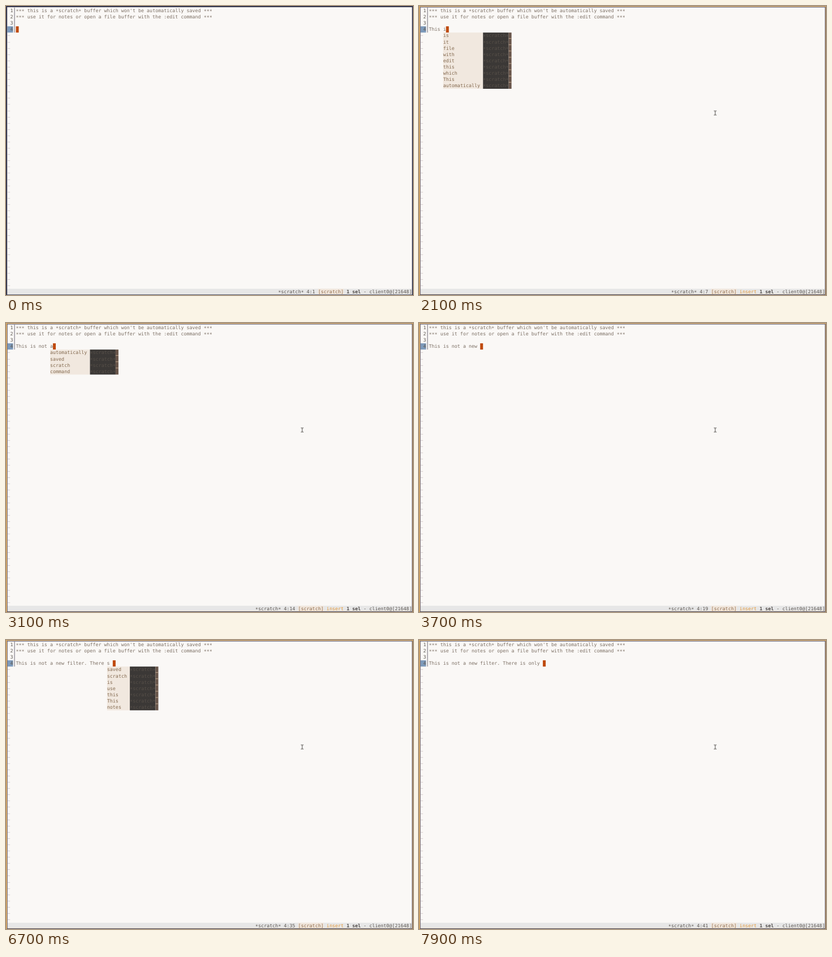
An HTML page that plays this animation: 720 px wide and 513 px high, repeating every 8 s.

```html
<!DOCTYPE html>
<html lang="en">
<head>
<meta charset="utf-8">
<title>Scratch buffer</title>
<style>
html, body { margin: 0; width: 100%; height: 100%; overflow: hidden; background: #faf8f6; }
svg { display: block; width: 720px; height: 513px; }
text { font: 8.37px "DejaVu Sans Mono", monospace; white-space: pre; text-rendering: geometricPrecision; }
.bold { font-weight: bold; }
</style>
</head>
<body>
<svg id="stage" viewBox="0 0 720 513"></svg>
<script>
const LOOP = 8000, KEY = 100, FOCUS = 500, INSERT = 1300;
const CW = 5.04, RH = 11.09, TOP = 2.8, LEFT = 17.5, RIGHT = 718.3;
const INK = '#7c6f64', STATUS_ROW = 45;
const stage = document.getElementById('stage');

// Bursts of typing, one key per 100 ms: "." only in text, "|" waits,
// "<" deletes, "~" is a space that leaves the menu open.
const BURSTS = [
  [1600, 'Th'], [1900, ['is', ' ', 'i', 's', ' ', 'n', 'o', 't', ' ']],
  [3000, 'a| n|ew '], [3900, 'f|ilter. '], [5600, 'Ther'],
  [6200, 'e s||~|<<'], [7100, 'i|s only ']
];
const keys = BURSTS.flatMap(([start, list]) =>
  [...list].map((key, i) => ({ at: start + i * KEY, key })));

const WORDS = ('saved scratch is it use file with edit this which This notes ' +
  'automatically command buffer open or for be the won').split(' ');

const col = i => LEFT + i * CW;
const row = i => TOP + i * RH;

const rect = (x, y, w, h, fill) =>
  `<rect x="${x}" y="${y}" width="${w}" height="${h}" fill="${fill}"/>`;

// Asterisks sit lower than the font draws them.
function text(str, x, r, fill = INK, cls = '') {
  let dy = 0;
  const parts = str.split(/(\*+)/).filter(Boolean).map(s => {
    const want = s[0] === '*' ? 1.3 : 0, shift = want - dy;
    dy = want;
    return `<tspan dy="${shift}">${s}</tspan>`;
  });
  return `<text x="${x}" y="${row(r) + 8.3}" fill="${fill}" class="${cls}">${parts.join('')}</text>`;
}

function typed(t) {
  let s = '';
  for (const { at, key } of keys) {
    if (at > t) break;
    if (key === '<') s = s.slice(0, -1);
    else if (key !== '|') s += key;
  }
  return s;
}

function matches(query, before) {
  const fuzzy = new RegExp([...query].join('.*'));
  const hits = WORDS.filter(w => w !== query && fuzzy.test(w) &&
    (w !== 'This' || before.includes(w)));
  const first = w => w.startsWith(query);
  return [...hits.filter(first), ...hits.filter(w => !first(w))];
}

function menu(line) {
  const found = line.match(/(\w+)~?$/);
  if (!found) return '';
  const list = matches(found[1], line.slice(0, found.index));
  if (!list.length) return '';
  const x = col(found.index), y = row(4), h = list.length * RH;
  const wide = (Math.max(...list.map(w => w.length)) + 1) * CW;
  const dark = x + wide, bar = dark + 9 * CW;
  let out = rect(x, y, wide, h, '#f1e8df') + rect(dark, y, 9 * CW, h, '#3b3836') +
    rect(bar, y, CW, h, '#68554a');
  list.forEach((word, i) => {
    out += text(word, x, 4 + i, '#83694f') + text('*scratch*', dark, 4 + i, '#575049');
    if (i < list.length - 1) out += rect(bar, row(5 + i) - 1, CW, 0.9, '#cbb398');
  });
  return out;
}

function statusBar(column, insert) {
  const parts = [[`*scratch* 4:${column} `, '#5c5651'], ['[scratch]', '#94704f'], [' ', INK]];
  if (insert) parts.push(['insert ', '#e59a3c']);
  parts.push(['1 sel', '#504b48', 'bold'], [' - client0@[21648]', '#5c5651']);
  let x = RIGHT - CW * parts.reduce((n, p) => n + p[0].length, 0);
  let out = rect(2, row(STATUS_ROW), 716.5, RH, '#e7e7e7');
  for (const [str, fill, cls] of parts) {
    const w = str.length * CW;
    if (str === '[scratch]') out += rect(x, row(STATUS_ROW), w, RH, '#f0e6dc');
    // Leading blanks are skipped by moving x.
    const lead = str.length - str.trimStart().length;
    if (str.trim()) out += text(str.trim(), x + lead * CW, STATUS_ROW, fill, cls);
    x += w;
  }
  return out;
}

function frame(focused) {
  const line = (inset, width, color) =>
    `<rect x="${inset}" y="${inset}" width="${720 - 2 * inset}" height="${513 - 2 * inset}" ` +
    `fill="none" stroke="${color}" stroke-width="${width}"/>`;
  return focused
    ? line(0.6, 1.3, '#dcaa5f') + rect(0, 0, 1.8, 513, '#dcaa5f') +
      rect(1.7, 1.5, 717, 1, '#44435a') + rect(1.8, 1.5, 0.9, 511, '#55506a') +
      rect(718.2, 1.5, 1, 511, '#44435a') + rect(1.7, 512, 717, 1, '#44435a')
    : rect(0, 0, 720, 2.1, '#34364c') + rect(0, 0, 2.1, 513, '#34364c') +
      rect(718.3, 0, 1.7, 513, '#34364c') + rect(0, 512.2, 720, 0.8, '#34364c');
}

function base() {
  const gutter = col(-3);
  let out = rect(0, 0, 720, 513, '#faf8f6') +
    text("*** this is a *scratch* buffer which won't be automatically saved ***", LEFT, 0) +
    text('*** use it for notes or open a file buffer with the :edit command ***', LEFT, 1) +
    rect(gutter, row(3), 2 * CW, RH, '#7d9abb') +
    rect(14.6, row(0), 0.9, 4 * RH, '#5d5968');
  for (let i = 0; i < STATUS_ROW; i++) {
    out += i < 4 ? text(String(i + 1), col(-2), i, '#5c5651') : text('~', gutter, i, '#c6bdc0');
  }
  return out;
}

const pointer = '<path d="M521.7 186.2h1.6l.7.6.7-.6h1.6M524 186.8v6.2M521.7 193.6h1.6l.7-.6.7.6h1.6" ' +
  'fill="none" stroke="#4b4845" stroke-width="1"/>';

stage.innerHTML = base() + '<g id="live"></g>';
const live = document.getElementById('live');
let shown = '';

function draw(t) {
  const line = typed(t), focused = t >= FOCUS, insert = t >= INSERT;
  const state = [line, focused, insert].join();
  if (state === shown) return;
  shown = state;
  const n = line.length;
  live.innerHTML = text(line.replace(/~/g, ' '), LEFT, 3) +
    rect(col(n), row(3), CW, RH, '#bf4a0d') + menu(line) +
    statusBar(n + 1, insert) + frame(focused) + (focused ? pointer : '');
}

const began = performance.now();
function tick() {
  draw((performance.now() - began) % LOOP);
  requestAnimationFrame(tick);
}
tick();
</script>
</body>
</html>
```
